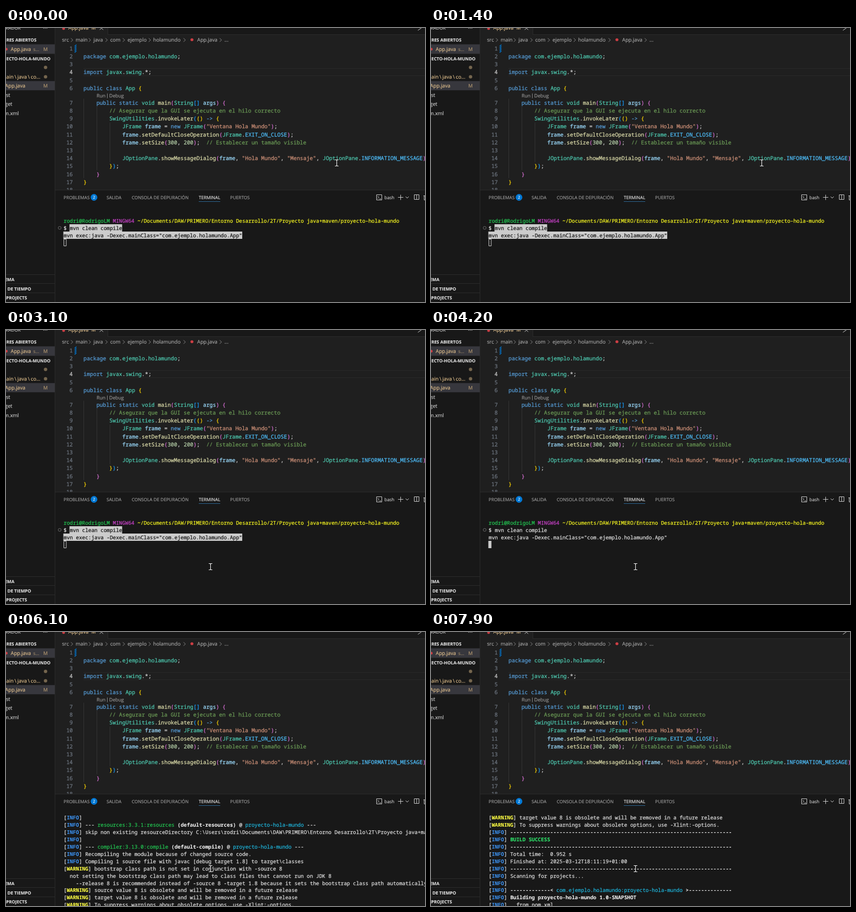
These frames come from a looping animation (800 by 525 pixels, 8 s). An HTML page with a canvas:

```html
<!DOCTYPE html>
<html lang="es">
<head>
<meta charset="utf-8">
<style>
html, body { margin: 0; width: 100%; height: 100%; overflow: hidden; background: #181818; }
canvas { display: block; }
</style>
</head>
<body>
<canvas id="stage" width="800" height="525"></canvas>
<script>
const ctx = document.getElementById('stage').getContext('2d');
const LOOP = 8000;
const MONO = '"Noto Sans Mono", "DejaVu Sans Mono", monospace';
const UI = '"Open Sans", "Noto Sans", sans-serif';
const SIDE = '#181818', EDIT = '#1f1f1f', EDGE = '#2b2b2b', FG = '#cccccc';
const DIM = '#9d9d9d', GIT = '#e2c08d', BLUE = '#0078d4', RED = '#cc3e44';

// Markup: "~" plus a colour key starts a run of text
const INK = {
  w: '#d4d4d4', b: '#569cd6', t: '#4ec9b0', f: '#dcdcaa', v: '#9cdcfe', s: '#ce9178',
  n: '#b5cea8', c: '#6a9955', k: '#4fc1ff',
  1: '#ffd700', 2: '#da70d6', 3: '#179fff'
};
const ANSI = {
  w: '#dddddd', W: '#f0f0f0', g: '#23c552', G: '#2ee56b', m: '#c540c5',
  y: '#f4f420', Y: '#fbfb43', B: '#3b8eea', c: '#1fb2d8'
};

const code = [
  '',
  '~bpackage ~tcom~w.~tejemplo~w.~tholamundo~w;',
  '',
  '~bimport ~tjavax~w.~tswing~w.*;',
  '',
  '~bpublic class ~tApp ~1{',
  '    ~bpublic static ~tvoid ~fmain~2(~tString~3[] ~vargs~2) {',
  '        ~c// Asegurar que la GUI se ejecuta en el hilo correcto',
  '        ~tSwingUtilities~w.~finvokeLater~3(~1() ~b-> ~1{',
  '            ~tJFrame ~vframe ~w= ~bnew ~tJFrame~2(~s"Ventana Hola Mundo"~2)~w;',
  '            ~vframe~w.~fsetDefaultCloseOperation~2(~tJFrame~w.~kEXIT_ON_CLOSE~2)~w;',
  '            ~vframe~w.~fsetSize~2(~n300~w, ~n200~2)~w;  ~c// Establecer un tamaño visible',
  '',
  '            ~tJOptionPane~w.~fshowMessageDialog~2(~vframe~w, ~s"Hola Mundo"~w, ~s"Mensaje"~w, ~tJOptionPane~w.~kINFORMATION_MESSAGE~2)~w;',
  '        ~1}~3)~w;',
  '    ~2}',
  '~1}',
  ''
];

const info = s => '~w[~BINFO~w] ' + s;
const warn = s => '~w[~YWARNING~w] ' + s;
const dash = n => '-'.repeat(n);
const goal = (name, id) => info(`--- ~g${name} ~W(${id})~w @ ~cproyecto-hola-mundo~w ---`);
const rule = info('~W' + dash(72));
const home = 'C:\\Users\\rodri\\Documents\\DAW\\PRIMERO\\Entorno Desarrollo\\2T\\Proyecto java+maven\\proyecto-hola-mundo\\';
const header = [
  info('Scanning for projects...'),
  info(''),
  info(`~W${dash(13)}< ~ccom.ejemplo.holamundo:proyecto-hola-mundo ~W>${dash(14)}`),
  info('~WBuilding proyecto-hola-mundo 1.0-SNAPSHOT'),
  info('  from pom.xml')
];
const commands = ['mvn clean compile', 'mvn exec:java -Dexec.mainClass="com.ejemplo.holamundo.App"'];
const log = [
  '',
  '~grodri@RodrigoLM ~mMINGW64 ~y~~/Documents/DAW/PRIMERO/Entorno Desarrollo/2T/Proyecto java+maven/proyecto-hola-mundo',
  '$ ' + commands[0],
  commands[1],
  ...header,
  info(`~W${dash(32)}[ jar ]${dash(33)}`),
  info(''),
  goal('clean:3.2.0:clean', 'default-clean'),
  info('Deleting ' + home + 'target'),
  info(''),
  goal('resources:3.3.1:resources', 'default-resources'),
  info('skip non existing resourceDirectory ' + home + 'src\\main\\resources'),
  info(''),
  goal('compiler:3.13.0:compile', 'default-compile'),
  info('Recompiling the module because of changed source code.'),
  info('Compiling 1 source file with javac [debug target 1.8] to target\\classes'),
  warn('bootstrap class path is not set in conjunction with -source 8'),
  '  not setting the bootstrap class path may lead to class files that cannot run on JDK 8',
  '    --release 8 is recommended instead of -source 8 -target 1.8 because it sets the bootstrap class path automatically',
  warn('source value 8 is obsolete and will be removed in a future release'),
  warn('target value 8 is obsolete and will be removed in a future release'),
  warn('To suppress warnings about obsolete options, use -Xlint:-options.'),
  rule,
  info('~GBUILD SUCCESS'),
  rule,
  info('Total time:  0.952 s'),
  info('Finished at: 2025-03-12T18:11:19+01:00'),
  rule,
  ...header
];

// [time, lines printed so far]
const output = [[0, 4], [5050, 5], [5200, 10], [5300, 12], [5400, 13], [5500, 15],
  [5600, 18], [5800, 20], [6100, 26], [6200, 32], [7700, 33], [7850, 37]];
const FOCUS = 3400, ENTER = 3700;
const ROWS = 14, ROW_H = 13.9, TERM_X = 110, TERM_ADV = 5.88;
const CODE_X = 148, CODE_ADV = 6.17, LINE_H = 15.22;

function box(x, y, w, h, color) {
  ctx.fillStyle = color;
  ctx.fillRect(x, y, w, h);
}

function disc(x, y, r, color) {
  ctx.fillStyle = color;
  ctx.beginPath();
  ctx.arc(x, y, r, 0, 7);
  ctx.fill();
}

function path(points, color, width = 1) {
  ctx.strokeStyle = color;
  ctx.lineWidth = width;
  ctx.beginPath();
  points.forEach(([x, y], i) => i ? ctx.lineTo(x, y) : ctx.moveTo(x, y));
  ctx.stroke();
}

// A hairline outline gives the text a slightly heavier weight
function ink(s, x, y, color, weight) {
  ctx.fillStyle = ctx.strokeStyle = color;
  ctx.lineWidth = weight;
  ctx.fillText(s, x, y);
  ctx.strokeText(s, x, y);
}

// y is the middle of the capitals
function label(s, x, y, color, size = 9.7, align = 'left', weight = 400) {
  ctx.font = `${weight} ${size}px ${UI}`;
  ctx.textAlign = align;
  ink(s, x, y + size * 0.36, color, 0.15);
}

function mono(s, x, y, adv, color, bold) {
  ctx.font = `${bold ? 700 : 400} ${adv / 0.6}px ${MONO}`;
  ctx.textAlign = 'left';
  ink(s, x, y + adv * 0.59, color, bold ? 0.1 : 0.25);
}

function rich(line, x, y, adv, inks) {
  const parts = line.replace(/~~/g, '\0').split('~');
  let col = 0;
  parts.forEach((part, i) => {
    const key = i ? part[0] : 'w';
    const s = (i ? part.slice(1) : part).replace('\0', '~');
    if (s.trim()) mono(s, x + col * adv, y, adv, inks[key], /[A-Z]/.test(key));
    col += s.length;
  });
}

const lineY = n => n < 7 ? 39 + (n - 1) * LINE_H : 143 + (n - 7) * LINE_H;

function drawEditor() {
  box(94, 0, 706, 310, EDIT);
  box(194, 0, 606, 12, SIDE);
  box(194, 12, 606, 1, EDGE);
  box(194, 0, 1, 12, EDGE);
  disc(110, 1, 2.6, RED);
  label('App.java', 119, 0, GIT);
  label('M', 163, 0, GIT, 9.2);
  path([[179, -3], [185.5, 3.5]], FG);
  path([[185.5, -3], [179, 3.5]], FG);
  path([[786.5, -5], [793, 0], [786.5, 4.5]], FG);

  [['src', 107], ['main', 133], ['java', 167], ['com', 199], ['ejemplo', 232],
   ['holamundo', 281], ['App.java', 365], ['...', 417]]
    .forEach(([s, x]) => label(s, x, 22.5, '#a9a9a9'));
  [126, 160, 192, 225, 274.5, 341, 410].forEach(x =>
    path([[x - 2, 19.5], [x + 1.5, 23], [x - 2, 26.5]], '#8a8a8a'));
  disc(355, 22.5, 2.8, RED);

  box(148, 77, 652, 1, '#292929');
  box(148, 91, 652, 1, '#292929');
  [[148, 7, 16], [173, 8, 15], [198, 10, 14]].forEach(([x, a, b]) =>
    box(x, lineY(a) - 7.5, 1, (b - a + 1) * LINE_H, '#343434'));
  for (let y = 32; y < 46; y += 3) path([[131, y + 3], [134.5, y]], BLUE, 1.6);

  code.forEach((line, i) => {
    const y = lineY(i + 1), num = String(i + 1);
    mono(num, 127.5 - num.length * CODE_ADV, y, CODE_ADV, i === 3 ? FG : '#6e7681');
    rich(line, CODE_X, y, CODE_ADV, INK);
  });
  label('Run', 173, 129.5, '#999999', 9.2);
  box(193, 125.5, 1, 9, '#888888');
  label('Debug', 197, 129.5, '#999999', 9.2);
}

function drawSidebar() {
  box(0, 0, 93, 525, SIDE);
  box(93, 0, 1, 525, EDGE);
  box(0, 31.3, 93, 17.6, '#37373d');
  box(0, 101.7, 93, 17.6, '#37373d');
  [49, 472, 489, 507].forEach(y => box(0, y, 93, 1, EDGE));
  label('RADOR', 28, 0, FG, 8.5, 'right');
  [72, 75, 78].forEach(x => disc(x, 0.5, 0.7, FG));
  [['RES ABIERTOS', 58, 22.5], ['ECTO-HOLA-MUNDO', 85, 58.5], ['EMA', 16, 481.5],
   ['DE TIEMPO', 48, 499.5], ['PROJECTS', 40, 517]]
    .forEach(([s, x, y]) => label(s, x, y, '#dddddd', 8.4, 'right', 700));
  disc(0.5, 40.5, 2.6, RED);
  label('App.java', 9, 40.5, GIT);
  label('s...', 52, 40.5, '#a08b6a', 8.8);
  label('M', 75.5, 40.5, '#b89c72', 9.2, 'center');
  disc(75.5, 75.5, 3.2, '#75664e');
  label('ain\u2009\\\u2009java\u2009\\\u2009co...', 65.5, 93.5, GIT, 9.7, 'right');
  disc(75.5, 93.5, 3.2, '#75664e');
  label('App.java', 37, 111, GIT, 9.7, 'right');
  label('M', 75.5, 111, '#b89c72', 9.2, 'center');
  [['st', 8, 128.5], ['get', 12, 146], ['m.xml', 24.5, 163.5]]
    .forEach(([s, x, y]) => label(s, x, y, FG, 9.7, 'right'));
}

function drawPanel() {
  box(94, 310, 706, 215, SIDE);
  box(94, 310, 706, 1, EDGE);
  [['PROBLEMAS', 110], ['SALIDA', 192], ['CONSOLA DE DEPURACIÓN', 240], ['TERMINAL', 368], ['PUERTOS', 428]]
    .forEach(([s, x]) => label(s, x, 325, x === 368 ? '#e7e7e7' : DIM, 8.55));
  box(368, 332, 41, 1, '#2c6693');
  disc(168, 324.5, 6.4, BLUE);
  label('2', 168, 324.5, '#ffffff', 7.4, 'center');

  ctx.strokeStyle = FG;
  ctx.lineWidth = 1;
  ctx.strokeRect(707.5, 319.5, 10, 10);
  path([[709.5, 322], [712, 324.5], [709.5, 327]], FG);
  path([[713, 327.5], [716, 327.5]], FG);
  label('bash', 722.5, 325, FG, 8.4);
  path([[748.5, 324.5], [758.5, 324.5]], FG);
  path([[753.5, 319.5], [753.5, 329.5]], FG);
  path([[763, 323], [766, 326], [769, 323]], FG);
  ctx.strokeRect(779.5, 319.5, 9, 9);
  path([[784, 319.5], [784, 328.5]], FG);
  path([[797, 321.5], [800, 321.5]], FG);
  path([[798.5, 321.5], [798.5, 329.5], [800, 329.5]], FG);
}

function drawTerminal(t) {
  const count = output.filter(step => step[0] <= t).pop()[1];
  const top = Math.max(0, count + 1 - ROWS);
  const rowY = i => 356 + (i - top) * ROW_H;
  const cellY = i => Math.round(rowY(i) - 7.5);
  ctx.save();
  ctx.beginPath();
  ctx.rect(94, 346, 706, 179);
  ctx.clip();
  for (let i = top; i < count; i++) rich(log[i], TERM_X, rowY(i), TERM_ADV, ANSI);

  if (t < ENTER) commands.forEach((cmd, i) => {
    const row = 2 + i, x = TERM_X + (i ? 0 : 2 * TERM_ADV);
    box(x - 0.5, cellY(row), cmd.length * TERM_ADV + 0.5, 14, FG);
    mono(cmd, x, rowY(row), TERM_ADV, SIDE);
  });
  ctx.strokeStyle = '#6b6b6b';
  ctx.lineWidth = 1;
  ctx.beginPath();
  ctx.arc(102.5, rowY(2) - 0.8, 2.8, 0, 7);
  ctx.stroke();

  if (t < FOCUS) {
    ctx.strokeStyle = FG;
    ctx.strokeRect(110.5, cellY(count) + 0.5, 4.5, 13);
  } else {
    box(109.5, cellY(count), TERM_ADV, 14, FG);
  }
  ctx.restore();
}

function drawPointer(t) {
  const u = Math.min(1, Math.max(0, (t - 2000) / 700));
  const e = u * u * (3 - 2 * u);
  const x = Math.round(632 - 241 * e) - 0.5, y = Math.round(258 + 195 * e) + 0.5;
  const shape = [
    [[x, y - 5.5], [x, y + 5.5]],
    [[x - 3.5, y - 6], [x - 1, y - 6], [x, y - 5], [x + 1, y - 6], [x + 3.5, y - 6]],
    [[x - 3.5, y + 6], [x - 1, y + 6], [x, y + 5], [x + 1, y + 6], [x + 3.5, y + 6]]
  ];
  shape.forEach(p => path(p, 'rgba(0,0,0,.45)', 2.4));
  shape.forEach(p => path(p, '#f0f0f0', 1.2));
}

function draw(t) {
  ctx.textRendering = 'geometricPrecision';
  ctx.textBaseline = 'alphabetic';
  ctx.lineJoin = 'round';
  drawEditor();
  drawSidebar();
  drawPanel();
  drawTerminal(t);
  drawPointer(t);
}

const start = performance.now();
function tick() {
  draw((performance.now() - start) % LOOP);
  requestAnimationFrame(tick);
}
tick();
</script>
</body>
</html>
```
